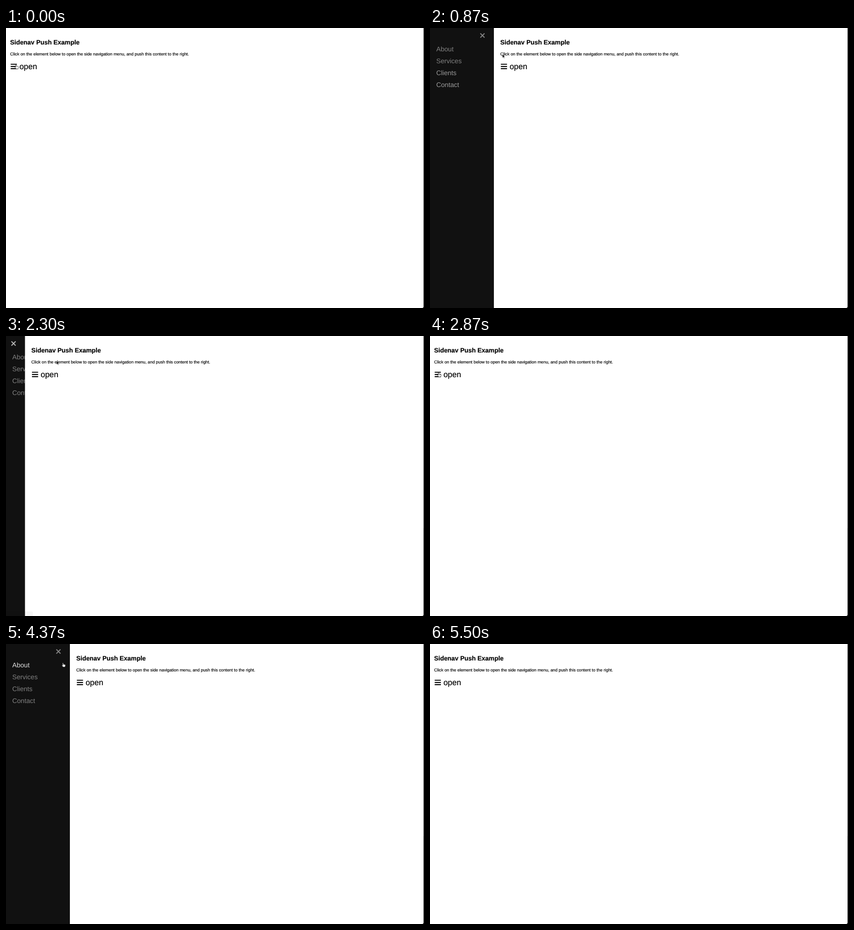
Write an HTML page that moves like this. It is 916 px wide and 612 px high and loops after 5760 ms.

```html
<!DOCTYPE html>
<html lang="en">
<head>
<meta charset="utf-8">
<title>Sidenav Push Example</title>
<style>
  @property --push { syntax: "<length>"; inherits: true; initial-value: 0px; }
  @property --hand { syntax: "<number>"; inherits: true; initial-value: 1; }

  html, body { margin: 0; width: 100%; height: 100%; overflow: hidden; background: #fff; }

  svg {
    display: block;
    width: 916px;
    height: 612px;
    font-family: "Liberation Sans", Arial, sans-serif;
    text-rendering: geometricPrecision;
    --dim: #818181;
    --lit: #f1f1f1;
    animation: push 5760ms infinite;
  }

  .main { transform: translateX(var(--push)); }
  .main text { stroke: #000; stroke-width: .18; }
  .close { transform: translate(calc(var(--push) - 30.1px), 16.4px); }
  .close path { fill: none; stroke: var(--dim); stroke-width: 2.2; animation: close 5760ms linear infinite; }

  .links { font-size: 14.5px; }
  .links text { fill: var(--dim); animation: 5760ms linear infinite; }
  .links .about { animation-name: about; }
  .links .services { animation-name: services; }
  .links .clients { animation-name: clients; }
  .links .contact { animation-name: contact; }

  .status { opacity: 0; animation: status 5760ms linear infinite; }

  .cursor { animation: move 5760ms linear infinite, shape 5760ms step-end infinite; }
  .hand { opacity: var(--hand); fill: #fff; stroke: #000; stroke-width: .7; stroke-linejoin: round; }
  .arrow { opacity: calc(1 - var(--hand)); fill: #000; stroke: #fff; stroke-width: .6; }

  /* each segment eases over 500 ms */
  @keyframes push {
    0%, .8% { --push: 0px; animation-timing-function: ease; }
    9.48%, 36.5% { --push: 145px; animation-timing-function: ease; }
    45.18%, 50.31% { --push: 0px; animation-timing-function: ease; }
    58.99%, 84.03% { --push: 145px; animation-timing-function: ease; }
    92.71%, 100% { --push: 0px; }
  }

  @keyframes about {
    0%, 17.01% { fill: var(--dim); }
    19.62% { fill: #d0d0d0; }
    24.5%, 27.26% { fill: var(--dim); }
    28.99% { fill: #bbb; }
    32.12%, 73% { fill: var(--dim); }
    75.87% { fill: #e0e0e0; }
    77.6% { fill: #ececec; }
    82.47%, 100% { fill: var(--dim); }
  }
  @keyframes services {
    0%, 1.5% { fill: var(--dim); }
    2.3% { fill: #999; }
    7%, 19.79% { fill: var(--dim); }
    22.05% { fill: #c0c0c0; }
    26.2% { fill: #888; }
    27.26% { fill: #969696; }
    28.5%, 100% { fill: var(--dim); }
  }
  @keyframes clients {
    0%, 1.74% { fill: var(--dim); }
    5.4% { fill: #e8e8e8; }
    10%, 11.46% { fill: var(--dim); }
    13.1% { fill: #bbb; }
    16.5%, 22.05% { fill: var(--dim); }
    23.3% { fill: #a8a8a8; }
    24.5% { fill: #959595; }
    26.2% { fill: #d0d0d0; }
    31%, 51.2% { fill: var(--dim); }
    54.34% { fill: #dcdcdc; }
    59%, 100% { fill: var(--dim); }
  }
  @keyframes contact {
    0%, 5.5% { fill: var(--dim); }
    10.7%, 11.5% { fill: var(--lit); }
    16.3%, 23.3% { fill: var(--dim); }
    24.5% { fill: #b8b8b8; }
    28.2%, 54.34% { fill: var(--dim); }
    57.81% { fill: #d8d8d8; }
    62%, 100% { fill: var(--dim); }
  }
  @keyframes close {
    0%, 32.1% { stroke: var(--dim); }
    36%, 37% { stroke: var(--lit); }
    42.2%, 78.1% { stroke: var(--dim); }
    83%, 84.6% { stroke: var(--lit); }
    89.8%, 100% { stroke: var(--dim); }
  }

  @keyframes status {
    0%, 37.5% { opacity: 0; }
    39%, 40% { opacity: .035; }
    42.5%, 86% { opacity: 0; }
    87.5%, 88.5% { opacity: .035; }
    92%, 100% { opacity: 0; }
  }

  @keyframes shape {
    0% { --hand: 1; }
    13.28% { --hand: 0; }
    17.01% { --hand: 1; }
    37.85% { --hand: 0; }
    43.06% { --hand: 1; }
    57.81% { --hand: 0; }
    63.72% { --hand: 1; }
    69.97% { --hand: 0; }
    73% { --hand: 1; }
    84.55%, 100% { --hand: 0; }
  }

  @keyframes move {
    0%, .8% { transform: translate(23.5px, 85px); }
    1.91% { transform: translate(27px, 92px); }
    4.69% { transform: translate(60px, 113px); }
    5.73% { transform: translate(79.5px, 127.5px); }
    10.42% { transform: translate(110px, 118px); }
    12.5% { transform: translate(130px, 100px); }
    13.89% { transform: translate(150px, 78px); }
    15.28% { transform: translate(162px, 60px); }
    17.01% { transform: translate(140px, 50px); }
    18.75% { transform: translate(100px, 52px); }
    20.83% { transform: translate(85px, 70px); }
    22.57% { transform: translate(82px, 95px); }
    23.96% { transform: translate(84px, 117px); }
    26.56% { transform: translate(91.5px, 69px); }
    28.13% { transform: translate(98px, 54px); }
    31.25% { transform: translate(106px, 33px); }
    32.47% { transform: translate(114px, 18px); }
    36.44% { transform: translate(115px, 19px); }
    37.5% { transform: translate(115px, 22px); }
    39.93% { transform: translate(113px, 59px); }
    43.4% { transform: translate(60px, 84px); }
    46.01% { transform: translate(24px, 85px); }
    50.31% { transform: translate(20px, 85px); }
    51.5% { transform: translate(34px, 96px); }
    53.82% { transform: translate(80px, 112px); }
    56.08% { transform: translate(125px, 125px); }
    59.03% { transform: translate(150px, 118px); }
    62.5% { transform: translate(165px, 104px); }
    64.76%, 69.44% { transform: translate(175px, 80px); }
    71.35% { transform: translate(260px, 62px); }
    73% { transform: translate(138px, 48px); }
    75.87% { transform: translate(126.5px, 46px); }
    77.78% { transform: translate(117px, 26px); }
    79.34% { transform: translate(115px, 18px); }
    84.03% { transform: translate(116px, 17px); }
    89.76% { transform: translate(330px, 30px); }
    93.75% { transform: translate(548px, 8px); }
    94.6%, 100% { transform: translate(556px, -10px); }
  }
</style>
</head>
<body>
<svg viewBox="0 0 916 612">
  <rect width="150" height="612" fill="#111"/>
  <g class="links">
    <text class="about" x="13.8" y="51">About</text>
    <text class="services" x="13.8" y="77">Services</text>
    <text class="clients" x="13.8" y="103">Clients</text>
    <text class="contact" x="13.8" y="129">Contact</text>
  </g>
  <g class="close"><path d="M-4.6-4.6 4.6 4.6M4.6-4.6-4.6 4.6"/></g>

  <g class="main">
    <rect x="-5" width="930" height="612" fill="#fff"/>
    <text x="9" y="36.3" font-size="13.92" font-weight="700">Sidenav Push Example</text>
    <text x="9" y="59.6" font-size="9.28">Click on the element below to open the side navigation menu, and push this content to the right.</text>
    <path d="M10.3 79.3h13.5M10.3 84.1h13.5M10.3 88.9h13.5" stroke="#000" stroke-width="2.1"/>
    <text x="29.4" y="90" font-size="17.4">open</text>
  </g>

  <path class="status" d="M0 602h56q3 0 3 3v7H0z"/>
  <path d="M915 0h1v420h-1z" fill="#111"/>
  <path d="M915 420h1v192h-3q2-1 2-3z"/>

  <g class="cursor">
    <path class="hand" d="M-2.6-3.8q.1-1 .9-1t.9 1l.3 2.6q1.2-.8 1.7.1 1-.5 1.5.3 1.2-.2 1.2 1 0 2-.9 3.4v1h-4.8v-.9q-1.4-1.3-2.2-2.9-.2-1.3 1-.9l.8.7z"/>
    <path class="arrow" d="M-2-5v8.2l1.9-1.8 1.3 2.9 1.3-.6-1.3-2.8h2.6z"/>
  </g>
</svg>
</body>
</html>
```
